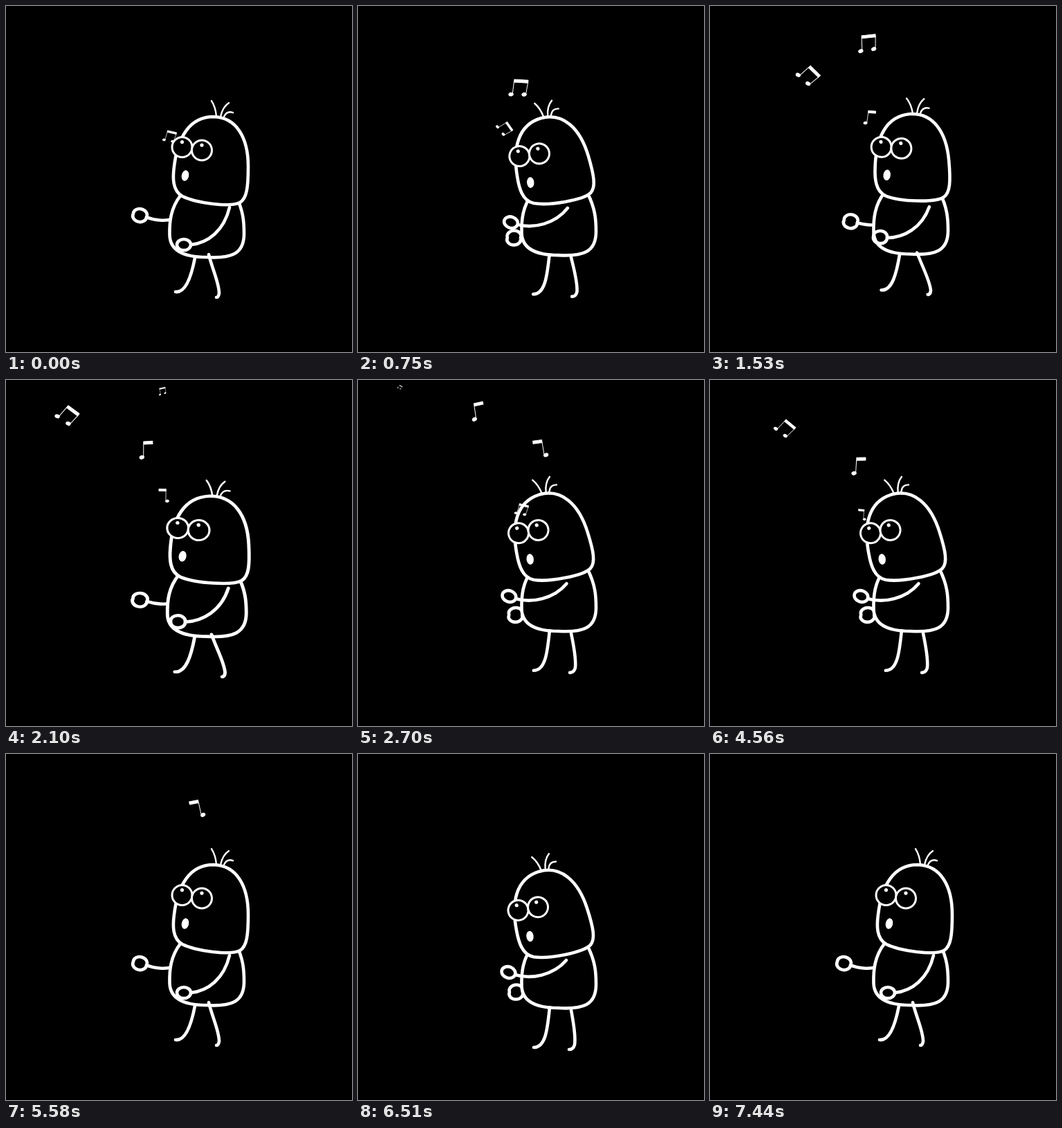
Animation, 500 px wide and 500 px high, one loop 7470 ms. Source, as an HTML page:

```html
<!DOCTYPE html>
<html lang="en">
<head>
<meta charset="utf-8">
<title>Dancing singer</title>
<style>
  html, body { margin: 0; width: 100%; height: 100%; overflow: hidden; background: #000; }
  svg { display: block; width: 100vw; height: 100vh; }
  path, circle, ellipse { fill: none; stroke: #fff; stroke-width: 4.6; stroke-linecap: round; stroke-linejoin: round; }
  .solid { fill: #000; }
  .thin { stroke-width: 2.4; }
  .eye { fill: #000; stroke-width: 3; }
  .white { fill: #fff; stroke: none; }
  .note { fill: #fff; stroke-width: 1; }
</style>
</head>
<body>
<svg viewBox="0 0 500 500"></svg>
<script>
const LOOP = 7470, SWAY = 1860, STEP = SWAY / 2;
const { PI, sin, cos, min, max } = Math;

function add(parent, tag, attrs = {}) {
  const el = document.createElementNS('http://www.w3.org/2000/svg', tag);
  for (const k in attrs) el.setAttribute(k, attrs[k]);
  return parent.appendChild(el);
}
const place = (el, value) => el.setAttribute('transform', value);
const path = (parent, d, cls = '') => add(parent, 'path', { d, class: cls });

// Back to front: body and limbs, notes, face
const svg = document.querySelector('svg');
const figure = add(svg, 'g'), notes = add(svg, 'g'), front = add(svg, 'g');

// A limb bends between a leaning-back and a leaning-forward curve.
const limb = (back, forward) => ({ el: path(figure, back), back, forward });
const hand = (tilt, dx, dy) => ` a10 8 ${tilt} 1 1 ${dx} ${dy} a10 8 ${tilt} 1 1 ${-dx} ${-dy}`;

const farArm = limb('M240 308 C230 311 215 310 203 305' + hand(12, -19, -5),
                    'M262 338 C255 339 247 340 238 340' + hand(-4, -19, 0));
path(figure, 'M252 274 C238 292 236 312 236.5 331 C237 350 251 363 290 363 C325 365 344 359 344 329 C344 312 343 296 332 274', 'solid');
const leftLeg = limb('M273 364 C268 390 260 415 245 413', 'M277 362 C274 390 272 420 254 420');
const rightLeg = limb('M293 359 C298 380 308 400 308 415 Q307 421 304 421',
                      'M308 366 C311 383 315 402 313 416 Q311 423 305 423');
const head = add(figure, 'g');
path(head, 'M300 160 C333 161 350 190 350 232 C350 262 348 278 338 284 C325 291 275 285 255 275 C240 267 241 247 243 232 C248 190 265 160 300 160Z', 'solid');
path(head, 'M304 160Q303 146 297 137M310 160Q313 146 322 140M315 160Q319 151 328 154', 'thin');
const nearArm = limb('M323 291 C315 325 292 342 267 345' + hand(0, -20, 0),
                     'M301 294 C282 316 250 322 227 315' + hand(20, -19, -7));
const limbs = [farArm, nearArm, leftLeg, rightLeg];

const face = add(front, 'g');
for (const [cx, cy] of [[254.5, 204], [283, 208.5]]) {
  add(face, 'circle', { cx, cy, r: 14.5, class: 'eye' });
  add(face, 'circle', { cx, cy: cy - 7.5, r: 2.6, class: 'white' });
}
add(face, 'ellipse', { cx: 259, cy: 245, rx: 5.2, ry: 7.8, transform: 'rotate(12 259 245)', class: 'white' });

const mix = (a, b, k) => a + (b - a) * k;
function blend(a, b, k) {
  const to = b.match(/-?[\d.]+/g);
  let i = 0;
  return a.replace(/-?[\d.]+/g, n => +mix(+n, +to[i++], k).toFixed(2));
}

function drawFigure(t) {
  const lean = (1 - cos(2 * PI * t / SWAY)) / 2;
  const beat = sin(2 * PI * t / STEP);
  const stride = sin(PI * t / STEP) ** 2;
  const wide = 1 + 0.06 * max(0, beat);
  const bob = `translate(${290 * (1 - wide)} ${7 * beat + 4 * lean}) scale(${wide} 1)`;
  const nod = `translate(${-3 * lean} ${1.8 * lean}) rotate(${-18 * lean} 295 275)`;
  for (const g of [figure, front]) place(g, bob);
  for (const g of [head, face]) place(g, nod);
  for (const l of limbs) l.el.setAttribute('d', blend(l.back, l.forward, lean));
  for (const arm of [farArm, nearArm]) place(arm.el, `translate(0 ${3.5 * stride})`);
  const kick = 0.17 * stride;
  place(rightLeg.el, `matrix(1 0 ${kick} 1 ${-345 * kick} 0)`);
}

const knob = (x, y) => `M${x - 3.2} ${y + .7}a3.2 2.3 -12 1 1 6.4 -1.4a3.2 2.3 -12 1 1 -6.4 1.4z`;
const PAIR = 'M-8 -12H12V-8H-8zL-9.5 10M12 -10L10 8' + knob(-11.5, 10) + knob(7.5, 9);
const LEFT = 'M0 -12H13V-8H0zL-1.5 10' + knob(-4, 10.5);
const RIGHT = 'M0 -12H-13V-8H0zL.5 10' + knob(3, 10.5);

const KINDS = [
  { shape: PAIR, x: 238, drift: -12, tilt: 19 },
  { shape: PAIR, x: 230, drift: -170, tilt: 62 },
  { shape: LEFT, x: 243, drift: -85, tilt: 14 },
  { shape: RIGHT, x: 217, drift: 95, tilt: 10 }
];

// Two rounds of four notes; those of the second round fade earlier.
const song = Array.from({ length: 8 }, (_, i) => {
  const kind = KINDS[i % 4];
  return {
    ...kind,
    el: path(notes, kind.shape, 'note'),
    born: 672 * i - 470,
    life: 2800 - 190 * (i % 4),
    reach: i < 4 ? 1 : 0.82
  };
});

function drawNote(n, t) {
  const q = (t - n.born) / n.life;
  const x = n.x + n.drift * (1 - cos(PI * q)) / 2;
  const y = 236 - 230 * (1 - max(0, 1 - q) ** 1.25);
  const grow = min(1, 0.4 + 1.5 * q);
  const fade = max(0, min(1, 20 * q, 5 * (n.reach - q)));
  n.el.setAttribute('visibility', fade > 0 ? 'visible' : 'hidden');
  place(n.el, `translate(${x} ${y}) rotate(${n.tilt - 35 * q}) scale(${grow * fade})`);
}

const begin = performance.now();
function frame() {
  const t = (performance.now() - begin) % LOOP;
  drawFigure(t);
  for (const n of song) drawNote(n, t);
  requestAnimationFrame(frame);
}
frame();
</script>
</body>
</html>
```
